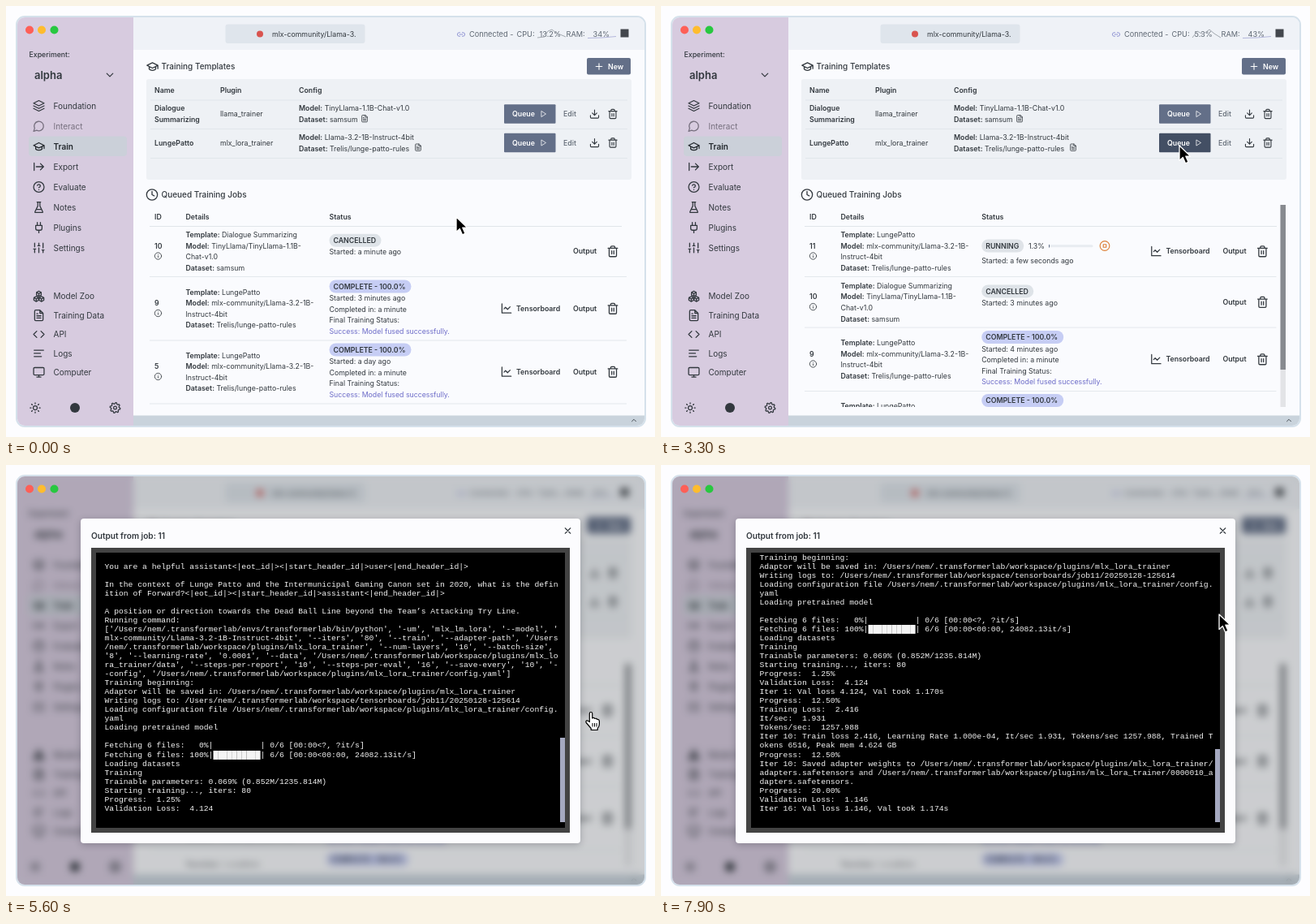
An HTML page for the animation above (8 s loop, 800 by 531 pixels).

```html
<!DOCTYPE html>
<html lang="en">
<head>
<meta charset="utf-8">
<title>Training queue</title>
<style>
  html, body { margin: 0; width: 100%; height: 100%; overflow: hidden; background: #fdfdff; }
  #stage { position: absolute; left: 0; top: 0; width: 800px; height: 531px; overflow: hidden; }
  svg { position: absolute; left: 0; top: 0; font-family: Inter, "Liberation Sans", sans-serif; }
  #veil { position: absolute; left: 14px; top: 14px; width: 773px; height: 503px; border-radius: 9px;
    background: rgba(23, 26, 28, .2); backdrop-filter: blur(5px); }
  #box { position: absolute; left: 92px; top: 65.5px; width: 616px; height: 400px; border-radius: 4px;
    background: #fcfcfe; box-shadow: 0 2px 8px rgba(20, 25, 35, .25); }
  #screen { position: absolute; left: 105px; top: 101.5px; width: 578px; height: 339px;
    border: 6px solid #434343; background: #000; }
  #log { position: absolute; left: 121.5px; top: 108.5px; margin: 0; color: #f4f4f4;
    font: 9.71px/11.04px "Liberation Mono", monospace; }
  #thumb { position: absolute; left: 683px; width: 5.5px; background: #a5a9c0; }
</style>
</head>
<body>
<div id="stage">
  <svg id="app" width="800" height="531"></svg>
  <div id="modal">
    <div id="veil"></div>
    <div id="box"></div>
    <div id="screen"></div>
    <pre id="log"></pre>
    <div id="thumb"></div>
    <svg id="frame" width="800" height="531"></svg>
  </div>
  <svg id="top" width="800" height="531"></svg>
</div>
<script>
const LOOP = 8000, INK = '#32383e', SOFT = '#5f6873', SLATE = '#636f88';
const $ = id => document.getElementById(id);

// Icons on a 24 unit grid
const RING = 'M22 12a10 10 0 1 1-20 0a10 10 0 1 1 20 0';
const cube = (x, y) => `M${x} ${y}l4.5 2.5v5l-4.5 2.5-4.5-2.5v-5zm-4.5 2.5l4.5 2.5 4.5-2.5m-4.5 2.5v5`;
const gear = () => 'M' + Array.from({ length: 32 }, (_, i) => {
  const a = (i + .5) * Math.PI / 16, r = i % 4 < 2 ? 10.2 : 7.8;
  return (12 + r * Math.cos(a)).toFixed(2) + ' ' + (12 + r * Math.sin(a)).toFixed(2);
}).join('L') + 'zM15 12a3 3 0 1 1-6 0a3 3 0 1 1 6 0';
const ICONS = {
  layers: 'M12 2L2 7l10 5 10-5zM2 17l10 5 10-5M2 12l10 5 10-5',
  chat: 'M7.9 20A9 9 0 1 0 4 16.1L2 22z',
  cap: 'M22 10v6M2 10l10-5 10 5-10 5zM6 12v5c3 3 9 3 12 0v-5',
  send: 'M3 5v14M21 12H7M15 18l6-6-6-6',
  help: RING + 'M9.1 9a3 3 0 0 1 5.8 1c0 2-3 3-3 3M12 17h.01',
  flask: 'M10 2v7.5l-5.4 11a1 1 0 0 0 1 1.5h12.8a1 1 0 0 0 1-1.5L14 9.5V2M8.5 2h7M7 16h10',
  plug: 'M12 22v-5M9 8V2M15 8V2M18 8v5a4 4 0 0 1-4 4h-4a4 4 0 0 1-4-4V8z',
  sliders: 'M4 21v-7M4 10V3M12 21v-9M12 8V3M20 21v-5M20 12V3M2 14h4M10 8h4M18 16h4',
  boxes: cube(12, 2) + cube(7, 12) + cube(17, 12),
  file: 'M14 2H6a2 2 0 0 0-2 2v16a2 2 0 0 0 2 2h12a2 2 0 0 0 2-2V8zM14 2v6h6M16 13H8M16 17H8M10 9H8',
  code: 'M16 18l6-6-6-6M8 6l-6 6 6 6',
  lines: 'M21 6H3M15 12H3M17 18H3',
  monitor: 'M4 3h16a2 2 0 0 1 2 2v10a2 2 0 0 1-2 2H4a2 2 0 0 1-2-2V5a2 2 0 0 1 2-2zM8 21h8M12 17v4',
  sun: 'M16 12a4 4 0 1 1-8 0a4 4 0 1 1 8 0M12 2v2M12 20v2M4.9 4.9l1.4 1.4M17.7 17.7l1.4 1.4M2 12h2M20 12h2M6.3 17.7l-1.4 1.4M19.1 4.9l-1.4 1.4',
  gear: gear(),
  clock: RING + 'M12 6v6l4 2',
  info: RING + 'M12 16v-4M12 8h.01',
  stop: RING + 'M9 9h6v6H9z',
  trash: 'M3 6h18M19 6v14a2 2 0 0 1-2 2H7a2 2 0 0 1-2-2V6M8 6V4a2 2 0 0 1 2-2h4a2 2 0 0 1 2 2v2M10 11v6M14 11v6',
  save: 'M21 15v4a2 2 0 0 1-2 2H5a2 2 0 0 1-2-2v-4M7 10l5 5 5-5M12 15V3',
  chart: 'M3 3v18h18M19 9l-5 5-4-4-3 3',
  link: 'M9 17H7A5 5 0 0 1 7 7h2M15 7h2a5 5 0 1 1 0 10h-2M8 12h8',
  play: 'M6 3l14 9-14 9z',
  plus: 'M5 12h14M12 5v14',
  down: 'M6 9l6 6 6-6',
  up: 'M6 15l6-6 6 6',
  close: 'M18 6L6 18M6 6l12 12'
};

// Drawing helpers; y is the middle of a line of text
const icon = (name, x, y, size = 16, color = INK, w = 2) =>
  `<path d="${ICONS[name]}" transform="translate(${x - size / 2} ${y - size / 2}) scale(${size / 24})"
    fill="none" stroke="${color}" stroke-width="${w}" stroke-linecap="round" stroke-linejoin="round"/>`;
const txt = (x, y, s, size = 8.77, weight = 400, fill = INK, id = '') =>
  `<text id="${id}" x="${x}" y="${y + size * .364}" font-size="${size}" font-weight="${weight}" fill="${fill}">${s}</text>`;
const bold = (x, y, s, fill) => txt(x, y, s, 8.77, 600, fill);
const pair = (x, y, key, value) => txt(x, y, `<tspan font-weight="600">${key}:</tspan> ${value}`);
const rect = (x, y, w, h, fill, r = 0, id = '') =>
  `<rect id="${id}" x="${x}" y="${y}" width="${w}" height="${h}" rx="${r}" fill="${fill}"/>`;
const dot = (x, y, r, fill) => `<circle cx="${x}" cy="${y}" r="${r}" fill="${fill}"/>`;
const chip = (x, y, w, s, fill) => rect(x, y - 8, w, 16, fill, 8) + bold(x + 5, y, s);
const group = (id, body) => `<g id="${id}">${body}</g>`;

const GAME = 'LungePatto', RULES = 'Trelis/lunge-patto-rules';

function sidebar() {
  const item = (name, s, y, color = INK, weight = 400) =>
    icon(name, 40.5, y, 15.5, color) + txt(58.5, y, s, 10, weight, color);
  const main = [['layers', 'Foundation'], ['chat', 'Interact', '#77707f'], ['cap', 'Train', '#22272c', 600],
    ['send', 'Export'], ['help', 'Evaluate'], ['flask', 'Notes'], ['plug', 'Plugins'], ['sliders', 'Settings']];
  const more = [['boxes', 'Model Zoo'], ['file', 'Training Data'], ['code', 'API'], ['lines', 'Logs'], ['monitor', 'Computer']];
  return rect(14, 14, 143, 503, '#d7cbdf') + txt(28.5, 60, 'Experiment:', 8.77, 500)
    + txt(35, 85.5, 'alpha', 13, 600) + icon('down', 128, 85, 15)
    + rect(28, 160.5, 121, 24.5, '#cbd0d9', 4)
    + main.map(([n, s, c, w], i) => item(n, s, 123 + 25 * i, c, w)).join('')
    + more.map(([n, s], i) => item(n, s, 357.7 + 23.4 * i)).join('')
    + icon('sun', 36, 495, 15) + dot(85, 495, 6, INK) + icon('gear', 134.5, 495, 15);
}

function header() {
  return rect(157, 14, 630, 40, '#eff2f7') + rect(270.5, 22.5, 172, 23.5, '#dfe5ec', 3)
    + dot(313, 34.5, 4, '#d9544f') + txt(328, 34.5, 'mlx-community/Llama-3.')
    + icon('link', 561, 35, 11, '#8a8fd0') + txt(571, 35, 'Connected -', 9.2, 400, SOFT)
    + txt(629.5, 35, 'CPU:', 9.2, 400, SOFT) + txt(657.5, 35, '', 9.2, 400, SOFT, 'cpu')
    + txt(690.5, 35, 'RAM:', 9.2, 400, SOFT) + txt(723.5, 35, '', 9.2, 400, SOFT, 'ram')
    + '<polyline id="spark" fill="none" stroke="#a3a9b0" stroke-width="1"/>'
    + '<path d="M717 39.5L735 39L752 37.5" fill="none" stroke="#b4b7dc"/>'
    + rect(757.5, 28.5, 10, 10, '#43474d');
}

function templates() {
  const row = (y, name, plugin, model, data, fileX, id) => name.map((s, i) =>
      bold(183, y + (i - (name.length - 1) / 2) * 13.4, s)).join('')
    + txt(264, y, plugin) + pair(361, y - 6.7, 'Model', model) + pair(361, y + 7, 'Dataset', data)
    + icon('file', fileX, y + 5.7, 10) + rect(614, y - 11.7, 63.5, 23.5, SLATE, 1, id)
    + bold(624, y, 'Queue', '#fff') + icon('play', 662.5, y, 9, '#fff')
    + txt(687, y, 'Edit', 8.77, 500, SOFT) + icon('save', 725.5, y, 13.5) + icon('trash', 748, y, 13.5);
  return icon('cap', 180.5, 74.5) + txt(191.5, 74.5, 'Training Templates', 10, 500)
    + rect(716, 64, 54, 20.5, SLATE, 2) + icon('plus', 731, 74.5, 13, '#fff') + bold(742, 74.5, 'New', '#fff')
    + rect(173, 90, 598, 124, '#eef1f5', 3)
    + bold(183, 104, 'Name') + bold(264, 104, 'Plugin') + bold(361, 104, 'Config')
    + [115.5, 151, 187].map(y => rect(178, y, 588, 1, '#e1e6eb')).join('')
    + row(133, ['Dialogue', 'Summarizing'], 'llama_trainer', 'TinyLlama-1.1B-Chat-v1.0', 'samsum', 442, '')
    + row(168.5, [GAME], 'mlx_lora_trainer', 'Llama-3.2-1B-Instruct-4bit', RULES, 508, 'queueBtn');
}

// One job row; y is its first line, sx the status column, ax the shift of the buttons
function job(y, id, chat, sx, ax, status, extra = {}) {
  const lines = chat ? ['Dialogue Summarizing', 'TinyLlama/TinyLlama-1.1B-', 'Chat-v1.0', 'samsum']
    : [GAME, 'mlx-community/Llama-3.2-1B-', 'Instruct-4bit', RULES];
  return bold(183, y + 13.6, id) + icon('info', 187.5, y + 26, 10)
    + pair(221.5, y, 'Template', lines[0]) + pair(221.5, y + 13.6, 'Model', lines[1])
    + txt(221.5, y + 27.2, lines[2]) + pair(221.5, y + 40.8, 'Dataset', lines[3]) + status
    + (extra.hot || '') + (extra.board === false ? '' : board(y + 20, ax))
    + bold(699 + ax, y + 20.3, 'Output') + icon('trash', 748 + ax, y + 20.3, 15.5)
    + rect(177, y + (extra.board === false || extra.hot ? 51 : 59), 588 + ax, 1, '#e4e8ed');
}
const board = (y, ax) => icon('chart', 617 + ax, y, 15) + bold(629 + ax, y, 'Tensorboard');
const done = (x, y, ago) => chip(x, y - 7, 101, 'COMPLETE - 100.0%', '#c6cdf4')
  + txt(x, y + 7.5, 'Started: ' + ago) + txt(x, y + 21, 'Completed in: a minute')
  + txt(x, y + 34.6, 'Final Training Status:')
  + txt(x, y + 48.1, 'Success: Model fused successfully.', 8.77, 400, '#6d6cc8');
const cancelled = (x, y, ago, id) => chip(x, y + 6.8, 64, 'CANCELLED', '#dee3e8')
  + txt(x, y + 21.3, 'Started: ' + ago, 8.77, 400, INK, id);

function jobs() {
  const head = x => bold(183, 259.5, 'ID') + bold(221.5, 259.5, 'Details') + bold(x, 259.5, 'Status');
  const a = 398.5, b = 395.2, ax = -6.6, noBoard = { board: false };
  const queued = chip(b, 289, 48, 'QUEUED', '#fcdcb4');
  const running = chip(b, 295.5, 52, 'RUNNING', '#dfe3e8') + txt(453, 295.5, '', 8.77, 400, INK, 'pct')
    + rect(478, 294.2, 55, 3, '#e8ecf1', 1.5, 'track') + rect(478, 293.7, 1, 4, SLATE, 1, 'fill')
    + icon('stop', 547, 295.5, 14, '#dd8038') + txt(b, 314, 'Started: a few seconds ago') + board(302, ax);
  return icon('clock', 180, 232.5) + txt(191.5, 232.5, 'Queued Training Jobs', 10, 500)
    + rect(177, 271, 582, 1, '#e0e5ea')
    + group('before', head(a)
      + job(282, 10, true, a, 0, cancelled(a, 282, 'a minute ago'), noBoard)
      + job(352.5, 9, false, a, 0, done(a, 352.5, '3 minutes ago'))
      + job(430.5, 5, false, a, 0, done(a, 430.5, 'a day ago')))
    + group('after', head(b)
      + job(282, 11, false, b, ax, group('queued', queued) + group('running', running),
        { board: false, hot: rect(686, 291, 44, 22, '#e9edf1', 2, 'hot') })
      + job(344.6, 10, true, b, ax, cancelled(b, 344.6, '2 minutes ago', 'ago'), noBoard)
      + job(415, 9, false, b, ax, done(b, 415, '4 minutes ago'))
      + job(493, 5, false, b, ax, done(b, 493, 'a day ago'))
      + rect(763.5, 245, 6.5, 249, '#e3e4e7') + rect(763.5, 245, 6.5, 203, '#878a8f'));
}

$('app').innerHTML = `<clipPath id="win"><rect x="14" y="14" width="773" height="503" rx="9"/></clipPath>
  <clipPath id="list"><rect x="157" y="220" width="630" height="274"/></clipPath>
  <rect x="13" y="13" width="775" height="505" rx="10" fill="#fafbfe" stroke="#d5e1eb" stroke-width="2"/>
  <g clip-path="url(#win)">${sidebar()}${header()}${templates()}
    <g clip-path="url(#list)">${jobs()}</g>
    ${rect(157, 504.5, 630, 13, '#c9d3dc')}${icon('up', 774, 510.5, 10)}</g>`;

$('frame').innerHTML = txt(105, 87, 'Output from job: 11', 10.1, 600) + icon('close', 692.5, 81, 13);

$('top').innerHTML = dot(29, 29.5, 5, '#fe5f57') + dot(44, 29.5, 5, '#febc2e') + dot(59.5, 29.5, 5, '#28c840')
  + group('arrow', '<path d="M0 0V18.5l4.3-4 3.2 7.3 3.5-1.5-3.2-7.2h5.7z" fill="#000" stroke="#fff" stroke-width="1.3" stroke-linejoin="round"/>')
  + group('hand', `<path d="M-1.7 11V1.2a1.7 1.7 0 0 1 3.4 0V7l1-.6q1.7-.3 2.1 1.1 2.3-.8 2.8 1 2.4-.3 2.8 1.8v4
    q0 3-2.2 5.2V21.500H.2v-2L-5.800 12.500q-1-2 .8-2.600 1.400-.200 3.300 1.600z"
    fill="#fff" stroke="#000" stroke-width="1.2" stroke-linejoin="round"/>
    <path d="M2 13v4.500M4.500 13v4.500M7 13v4.500" stroke="#000"/>`);

// Terminal output, wrapped at 96 columns
const HOME = '/Users/nem/.transformerlab/', PLUGIN = HOME + 'workspace/plugins/mlx_lora_trainer';
const LOG = `
You are a helpful assistant<|eot_id|><|start_header_id|>user<|end_header_id|>

In the context of Lunge Patto and the Intermunicipal Gaming Canon set in 2020, what is the definition of Forward?<|eot_id|><|start_header_id|>assistant<|end_header_id|>

A position or direction towards the Dead Ball Line beyond the Team’s Attacking Try Line.
Running command:
['${HOME}envs/transformerlab/bin/python', '-um', 'mlx_lm.lora', '--model', 'mlx-community/Llama-3.2-1B-Instruct-4bit', '--iters', '80', '--train', '--adapter-path', '${PLUGIN}', '--num-layers', '16', '--batch-size', '8', '--learning-rate', '0.0001', '--data', '${PLUGIN}/data', '--steps-per-report', '10', '--steps-per-eval', '16', '--save-every', '10', '--config', '${PLUGIN}/config.yaml']
Training beginning:
Adaptor will be saved in: ${PLUGIN}
Writing logs to: ${HOME}workspace/tensorboards/job11/20250128-125614
Loading configuration file ${PLUGIN}/config.yaml
Loading pretrained model

Fetching 6 files:   0%|          | 0/6 [00:00<?, ?it/s]
Fetching 6 files: 100%|██████████| 6/6 [00:00<00:00, 24082.13it/s]
Loading datasets
Training
Trainable parameters: 0.069% (0.852M/1235.814M)
Starting training..., iters: 80
Progress:  1.25%
Validation Loss:  4.124
Iter 1: Val loss 4.124, Val took 1.170s
Progress:  12.50%
Training Loss:  2.416
It/sec:  1.931
Tokens/sec:  1257.988
Iter 10: Train loss 2.416, Learning Rate 1.000e-04, It/sec 1.931, Tokens/sec 1257.988, Trained Tokens 6516, Peak mem 4.624 GB
Progress:  12.50%
Iter 10: Saved adapter weights to ${PLUGIN}/adapters.safetensors and ${PLUGIN}/0000010_adapters.safetensors.
Progress:  20.00%
Validation Loss:  1.146
Iter 16: Val loss 1.146, Val took 1.174s`.split('\n').flatMap(s => s.match(/.{1,96}/g) || ['']);

// Timeline
const QUEUED = 1600, RUNNING = 2500, STEP = 4500, OPEN = 5500;
const STATS = [
  [0, 13.2, 34, '655,39 664,38 668,31 673,29 678,33 690,38'],
  [1400, 11.1, 34, '655,34 659,38 663,30 669,29 674,36 682,33 690,37'],
  [2700, 5.3, 43, '655,39 661,31 668,35 676,29 682,34 690,39'],
  [4200, 5.8, 51, '655,28 666,38 678,36 690,37']
];
const PATH = [[0, 555, 260], [500, 555, 260], [1200, 639, 172], [3700, 639, 172], [4500, 709, 299],
  [5150, 709, 299], [5450, 721, 305], [7300, 721, 305], [7850, 688, 184], [LOOP, 688, 184]];

function pointer(t) {
  const i = PATH.findIndex(p => p[0] > t), [t0, x0, y0] = PATH[i - 1], [t1, x1, y1] = PATH[i];
  const u = (t - t0) / (t1 - t0), e = u * u * (3 - 2 * u);
  return [x0 + (x1 - x0) * e, y0 + (y1 - y0) * e];
}
const logLength = t => t < 6150 ? 29 : t < 6800 ? Math.min(40, 29 + Math.floor((t - 6150) / 25)) : 43;
const show = (id, on) => { $(id).style.display = on ? '' : 'none'; };
const set = (id, attrs) => { for (const k in attrs) $(id).setAttribute(k, attrs[k]); };

function draw(t) {
  const [x, y] = pointer(t);
  const open = t >= OPEN, running = t >= RUNNING;
  const [, cpu, ram, points] = STATS.filter(s => s[0] <= t).pop();
  $('cpu').textContent = cpu + '%';
  $('ram').textContent = ram + '%';
  set('spark', { points });

  show('before', t < QUEUED);
  show('after', t >= QUEUED);
  show('queued', !running);
  show('running', running);
  $('ago').textContent = `Started: ${running ? 3 : 2} minutes ago`;
  const pct = t < STEP ? 1.3 : 12.5, bar = t < STEP ? 478 : 484;
  $('pct').textContent = pct + '%';
  set('track', { x: bar, width: 532.5 - bar });
  set('fill', { x: bar, width: Math.max(1, pct * .46) });

  const overQueue = x > 614 && x < 677 && y > 157 && y < 180;
  const overOutput = !open && x > 686 && x < 730 && y > 291 && y < 313;
  set('queueBtn', { fill: overQueue ? '#434f64' : SLATE });
  show('hot', overOutput);

  show('modal', open);
  if (open) {
    const n = logLength(t), h = 9900 / (67 + n);
    $('log').textContent = LOG.slice(n - 29, n).join('\n');
    $('thumb').style.top = 439.5 - h + 'px';
    $('thumb').style.height = h + 'px';
  }

  const hand = overOutput || open && t < 7350;
  show('hand', hand);
  show('arrow', !hand);
  set(hand ? 'hand' : 'arrow', { transform: `translate(${x} ${y})` });
}

function tick() {
  draw(performance.now() % LOOP);
  requestAnimationFrame(tick);
}
tick();
</script>
</body>
</html>
```
